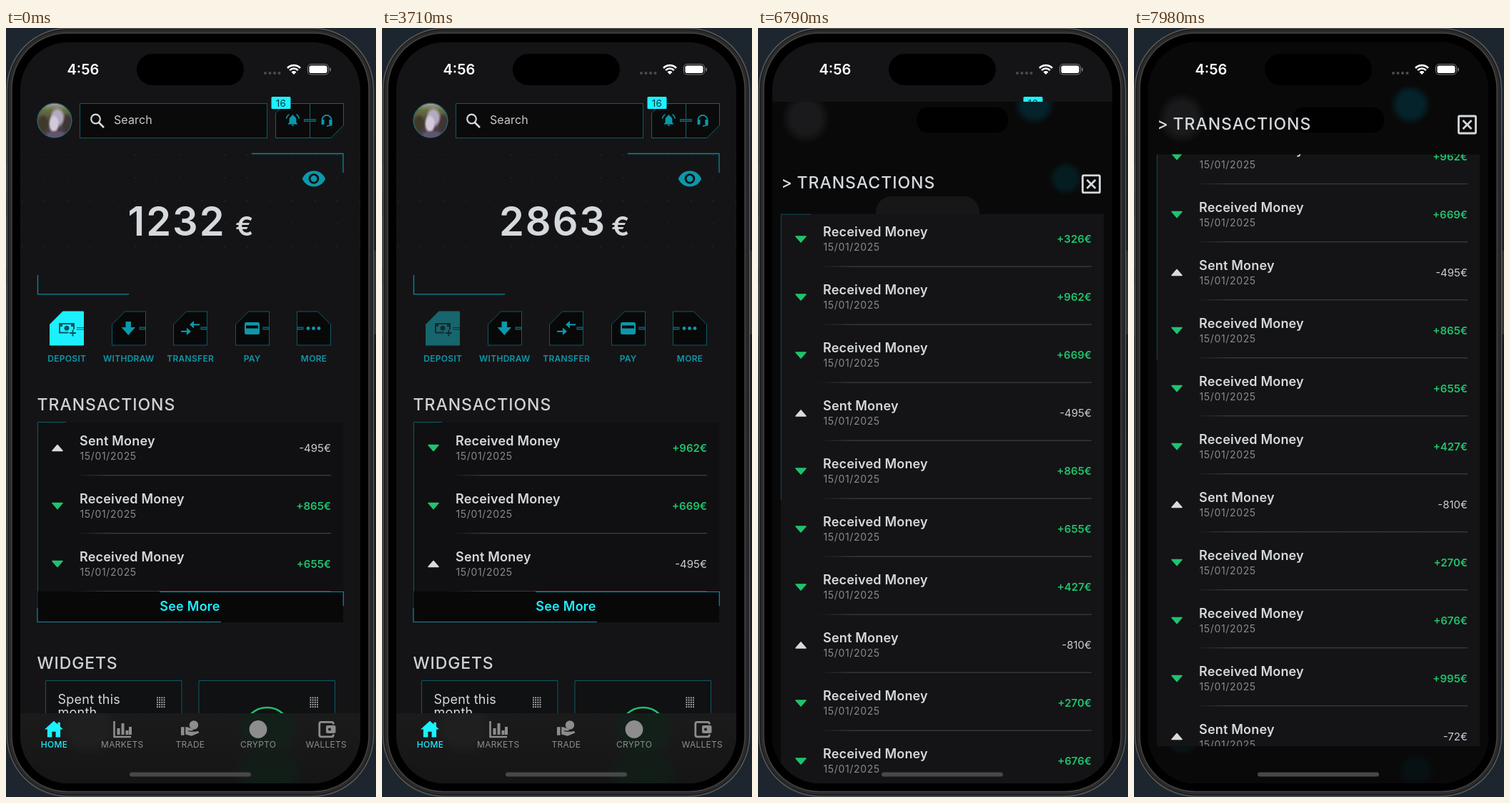
An HTML page with a canvas that plays this animation: 518 by 1074 pixels, repeating every 8 s.

```html
<!DOCTYPE html>
<html lang="en">
<head>
<meta charset="utf-8">
<title>Banking app</title>
<style>
html, body { margin: 0; width: 100%; height: 100%; overflow: hidden; background: #1a2129; }
canvas { display: block; width: 518px; height: 1074px; }
</style>
</head>
<body>
<canvas id="stage"></canvas>
<script>
const W = 518, H = 1074, LOOP = 8000, STEP = 70;
const CYAN = '#1cf0ff', TEAL = '#0b98ab', LINE = '#0c5a65', GREEN = '#20c36d';
const INK = '#d5d9dd', BG = '#141416', GREY = '#8d8d8e', DARK = '#080809';
const canvas = document.getElementById('stage');
const c = canvas.getContext('2d');
const dpr = window.devicePixelRatio || 1;
canvas.width = W * dpr;
canvas.height = H * dpr;

// Newest first; the first three arrive with the deposits.
const amounts = [326, 962, 669, -495, 865, 655, 427, -810, 270, 676, 995, -72];
const presses = [[2870, 3010, 3290], [3500, 3640, 3920], [4130, 4270, 4480]];
const eyeTaps = [[630, 700, 840], [1750, 1820, 1960]];
const morePress = [[6370, 6510, 6790]];

const EYE = 'M12 4.5C7 4.5 2.7 7.6 1 12c1.7 4.4 6 7.5 11 7.5s9.3-3.1 11-7.5c-1.7-4.4-6-7.5-11-7.5z' +
  'M12 17a5 5 0 1 1 0-10 5 5 0 0 1 0 10zM12 9a3 3 0 1 0 0 6 3 3 0 0 0 0-6z';
const BELL = 'M12 21.5a2 2 0 0 0 2-2h-4a2 2 0 0 0 2 2zM18 16v-5c0-3-1.6-5.6-4.5-6.3V4a1.5 1.5 0 0 0-3 0v.7' +
  'C7.6 5.4 6 8 6 11v5l-2 1.6v1h16v-1z';
const HOUSE = 'M12 3L2 12h3v8.5h5v-6h4v6h5V12h3l-3.2-2.9V4.5h-2.6v2.2z';
const HAND = 'M1 11h4v10H1zM6.5 11h2.2l6.3 2.4c1.2.5 1.1 2-.1 2.1h-3.2l-1.7-.6-.3.9 2 .8h6.3l3.4-.6' +
  'c1.3 0 2 1.1 1.6 2.1L14 21.8l-7.5-2z';

function text(s, x, y, size, color, { weight = 400, align = 'left', space = 0 } = {}) {
  c.font = `${weight} ${size}px Inter, Roboto, sans-serif`;
  c.letterSpacing = space + 'px';
  c.textAlign = align;
  c.fillStyle = color;
  c.fillText(s, x, y);
}

function rect(x, y, w, h, color) {
  c.fillStyle = color;
  c.fillRect(x, y, w, h);
}

function round(x, y, w, h, r, fill, stroke, lw = 1) {
  c.beginPath();
  c.roundRect(x, y, w, h, r);
  paint(fill, stroke, lw);
}

function paint(fill, stroke, lw = 1) {
  if (fill) { c.fillStyle = fill; c.fill(); }
  if (stroke) { c.strokeStyle = stroke; c.lineWidth = lw; c.stroke(); }
}

function poly(points, fill, stroke, lw, open) {
  c.beginPath();
  points.forEach(([x, y]) => c.lineTo(x, y));
  if (!open) c.closePath();
  paint(fill, stroke, lw);
}

const line = (points, color, lw = 1) => poly(points, null, color, lw, true);

function disc(x, y, r, fill, stroke, lw) {
  c.beginPath();
  c.arc(x, y, r, 0, 7);
  paint(fill, stroke, lw);
}

function icon(path, cx, cy, scale, color) {
  c.save();
  c.translate(cx, cy);
  c.scale(scale, scale);
  c.translate(-12, -12);
  c.fillStyle = color;
  c.fill(new Path2D(path), 'evenodd');
  c.restore();
}

function glow(x, y, rx, ry, color) {
  c.save();
  c.translate(x, y);
  c.scale(rx, ry);
  const g = c.createRadialGradient(0, 0, 0, 0, 0, 1);
  g.addColorStop(0, color);
  g.addColorStop(.6, color);
  g.addColorStop(1, color + '00');
  disc(0, 0, 1, g);
  c.restore();
}

function clipped(x, y, w, h, draw) {
  c.save();
  c.beginPath();
  c.rect(x, y, w, h);
  c.clip();
  draw();
  c.restore();
}

// Veils an area with the background, fading it as one group.
function veil(alpha, x, y, w, h) {
  c.globalAlpha = 1 - alpha;
  rect(x, y, w, h, BG);
  c.globalAlpha = 1;
}

// Dims at once on touch, eases back after release.
function pressAlpha(t, list) {
  for (const [down, up, end] of list) {
    if (t < down || t >= end) continue;
    if (t < up) return .2;
    const k = (t - up + 35) / (end - up + 35);
    return .2 + .8 * (k < .5 ? 2 * k * k : 1 - 2 * (1 - k) ** 2);
  }
  return 1;
}

function phone() {
  const g = c.createLinearGradient(0, 0, 0, H);
  g.addColorStop(0, '#1d262f');
  g.addColorStop(.5, '#15181d');
  g.addColorStop(1, '#1d262f');
  rect(0, 0, W, H, g);
  for (const [y, h] of [[190, 41], [262, 74], [356, 74]]) rect(0, y, 3, h, '#303236');
  rect(514, 311, 4, 117, '#303236');
  round(1.5, .5, 513, 1072.5, 85, '#1b1b1c', '#585859', 1.6);
  round(4, 3, 508, 1067.5, 82, '#2b2b2c');
  round(8, 7, 500, 1059.5, 78, '#000', '#444445', 1.4);
}

function statusBar() {
  round(183, 36, 150, 44, 22, '#000');
  text('4:56', 85.5, 65, 20, '#fff', { weight: 600 });
  for (let i = 0; i < 4; i++) disc(363 + i * 6.5, 63, 2, '#4b4b4d');
  c.save();
  c.beginPath();
  c.moveTo(403, 65);
  c.arc(403, 65, 20, -Math.PI * .75, -Math.PI * .25);
  c.closePath();
  c.clip();
  disc(403, 64.5, 4.5, '#fff');
  disc(403, 64.5, 8, null, '#fff', 2.6);
  disc(403, 64.5, 12.4, null, '#fff', 2.6);
  c.restore();
  round(422.5, 50.5, 29, 14.5, 4.5, null, '#77777a');
  round(424.5, 52.5, 25, 10.5, 2.8, '#fff');
  round(453, 55.5, 1.8, 5, 1, '#77777a');
}

function avatar() {
  c.save();
  c.beginPath();
  c.arc(68, 129, 23.5, 0, 7);
  c.clip();
  const g = c.createLinearGradient(0, 105, 0, 153);
  g.addColorStop(0, '#a9a3a6');
  g.addColorStop(.2, '#65703f');
  g.addColorStop(.55, '#4c4540');
  g.addColorStop(1, '#4a3a50');
  rect(44, 105, 48, 48, g);
  glow(86, 134, 9, 16, '#3f3535');
  glow(52, 134, 9, 14, '#403a2b');
  glow(72, 125, 11, 15, '#b4a9c0');
  glow(67, 134, 8, 14, '#d2cada');
  glow(70, 150, 18, 7, '#66546f');
  c.restore();
  disc(68, 129, 24, null, '#23838c', 1);
}

function header() {
  avatar();
  rect(103, 105, 263, 49, '#0a0a0b');
  c.strokeStyle = LINE;
  c.lineWidth = 1;
  c.strokeRect(103.5, 105.5, 262, 48);
  disc(125.5, 127, 6.3, null, INK, 2.2);
  line([[130, 132], [137, 139]], INK, 2.6);
  text('Search', 151, 134, 16, '#c6cacd', { space: .1 });

  poly([[391, 105.5], [472.5, 105.5], [472.5, 136], [455, 153.5], [377.5, 153.5], [377.5, 119]], '#0a0a0b', '#0c6672');
  line([[425.5, 106], [425.5, 153]], '#0c6672');
  rect(417, 127, 17, 4, '#0c6672');
  rect(418, 128.3, 15, 1.4, '#093038');
  icon(BELL, 401.5, 129, .82, TEAL);
  c.beginPath();
  c.arc(401.5, 128, 9, 3.3, 4.1);
  c.moveTo(409, 123);
  c.arc(401.5, 128, 9, -.96, -.16);
  paint(null, TEAL, 1.5);
  c.beginPath();
  c.arc(449, 128.5, 6.6, Math.PI, 0);
  c.lineTo(455.6, 135.5);
  c.lineTo(449, 137);
  paint(null, TEAL, 1.7);
  round(441.6, 128, 4, 7, 1.2, TEAL);
  round(452.4, 128, 4, 7, 1.2, TEAL);
  round(371.5, 96, 27, 17, 1.5, CYAN);
  text('16', 385, 109.5, 13.5, '#0a3c44', { align: 'center', space: .4 });
}

function balance(t) {
  for (let y = 177; y < 310; y += 32) {
    for (let x = 22; x < 496; x += 31.5) rect(Math.round(x), y, 1, 1, '#3b3c3f');
  }
  line([[344, 175.5], [472, 175.5], [472, 202]], '#0d8596', 1.3);
  line([[44.5, 345], [44.5, 371.8], [172, 371.8]], '#0d8596', 1.3);

  const hidden = t >= eyeTaps[0][1] && t < eyeTaps[1][1];
  icon(EYE, 431, 210.5, 1.47, TEAL);
  if (hidden) {
    line([[419, 197], [445, 223]], BG, 6);
    line([[419, 199], [443, 223]], TEAL, 2.4);
  }
  veil(pressAlpha(t, eyeTaps), 414, 194, 34, 32);

  const added = presses.filter(p => t >= p[1]).length;
  const total = amounts.slice(3 - added, 3).reduce((a, b) => a + b, 1232);
  text(hidden ? '****' : total, 239, 289.5, 56, INK, { weight: 600, align: 'center', space: 2 });
  text('€', 321, 289.5, 37.5, INK, { weight: 600 });
  return added;
}

function tile(x, fill, stroke, flip) {
  const pts = [[18, 0], [47, 0], [47, 47], [0, 47], [0, 18]];
  poly(pts.map(([px, py]) => [x + (flip ? 47 - px : px), 396 + py]), fill, stroke);
}

function link(x) {
  rect(x, 417.5, 9, 4, '#0c6c79');
  rect(x + 1, 418.8, 7, 1.4, '#071c20');
}

function deposit(t) {
  const dark = '#0b5660';
  tile(61.5, CYAN, CYAN);
  c.strokeStyle = dark;
  c.lineWidth = 2;
  c.strokeRect(75, 413, 20, 12.5);
  disc(85, 419.2, 3.4, dark);
  rect(76, 414, 3, 3, dark);
  rect(91, 414, 3, 3, dark);
  rect(87.5, 421, 12, 10, CYAN);
  line([[93.5, 421.5], [93.5, 430.5]], dark, 2);
  line([[89, 426], [98, 426]], dark, 2);
  line([[99, 418.5], [109, 418.5]], dark);
  line([[99, 421], [109, 421]], dark);
  veil(pressAlpha(t, presses), 60, 394, 51, 51);
}

function actions(t) {
  ['DEPOSIT', 'WITHDRAW', 'TRANSFER', 'PAY', 'MORE'].forEach((s, i) => {
    text(s, 85.3 + 86.45 * i, 466, 12, TEAL, { weight: 600, align: 'center', space: .3 });
    if (i) {
      const x = Math.round(61.5 + 86.4 * i) + .5;
      tile(x, DARK, LINE, i === 4);
      link(i === 4 ? x : x + 38);
    }
  });
  deposit(t);
  poly([[167.5, 410], [175, 410], [175, 418], [181, 418], [171.3, 429], [161.6, 418], [167.5, 418]], TEAL);
  line([[260, 414.2], [271, 414.2]], TEAL, 2);
  poly([[257, 414.2], [263, 409], [263, 419.4]], TEAL);
  line([[245, 423.8], [256, 423.8]], TEAL, 2);
  poly([[259, 423.8], [253, 418.6], [253, 429]], TEAL);
  round(334, 411, 21, 17, 2.5, TEAL);
  rect(336, 415.5, 17, 4, DARK);
  for (const x of [423, 430.5, 438]) disc(x, 419.5, 2.4, TEAL);
}

function row(x, y, width, amount) {
  const up = amount < 0, color = up ? '#d9dadb' : GREEN;
  const s = up ? -1 : 1, mid = y + 35.5;
  c.lineJoin = 'round';
  poly([[x + 21, mid - 4 * s], [x + 35, mid - 4 * s], [x + 28, mid + 4 * s]], color, color, 1.6);
  c.lineJoin = 'miter';
  text(up ? 'Sent Money' : 'Received Money', x + 59, y + 31.5, 18, INK, { weight: 600, space: .2 });
  text('15/01/2025', x + 59.5, y + 52, 14, '#88898b', { space: .65 });
  text((up ? '' : '+') + amount + '€', x + width - 17, y + 40.5, 15, up ? '#c9ccd0' : GREEN,
    { align: 'right', weight: up ? 400 : 600 });
  const g = c.createLinearGradient(x + 52, 0, x + 100, 0);
  g.addColorStop(0, '#3a3b3d00');
  g.addColorStop(1, '#3a3b3d');
  rect(x + 52, y + 73, width - 69, 1.3, g);
}

function transactions(t, added) {
  text('TRANSACTIONS', 43.5, 534, 23, '#cfd2d5', { weight: 500, space: 1 });
  rect(44, 551, 428, 236, '#101012');
  line([[44.5, 787], [44.5, 550.5], [84, 550.5]], LINE);
  amounts.slice(3 - added, 6 - added).forEach((a, i) => row(44, 551 + 81 * i, 428, a));

  rect(44, 787, 428, 43, DARK);
  line([[215, 787.5], [472.3, 787.5], [472.3, 807]], '#0d8c9d', 1.2);
  line([[44, 810], [44, 829.5], [301, 829.5]], '#0d8c9d', 1.2);
  line([[44, 788], [44, 809]], '#093a42');
  text('See More', 257.5, 814, 18, CYAN, { weight: 600, align: 'center', space: .25 });
  veil(pressAlpha(t, morePress), 43, 787, 430, 44);
}

function widgets() {
  text('WIDGETS', 43.5, 895, 23, '#cfd2d5', { weight: 500, space: .9 });
  for (const x of [55.5, 270]) {
    c.beginPath();
    c.rect(x, 911.5, 190.5, 60);
    paint('#101113', LINE);
    for (let i = 0; i < 20; i++) rect(x + 155.5 + i % 4 * 3.2, 934.5 + (i >> 2) * 3.2, 1.8, 1.8, '#b9bbbd');
  }
  text('Spent this', 72.5, 943.5, 18, INK, { space: .25 });
  text('month', 72.5, 962, 18, INK, { space: .25 });
  disc(365.5, 982, 33, null, GREEN, 2.4);
}

function navBar() {
  const g = c.createLinearGradient(0, 957, 0, 1055);
  g.addColorStop(0, '#1b1b1c');
  g.addColorStop(1, '#151516');
  rect(20, 957, 476, 98, g);
  clipped(20, 957, 476, 98, () => {
    glow(115, 978, 42, 38, '#1f1f20');
    glow(366, 975, 46, 50, '#132019');
    glow(368, 1038, 52, 38, '#121d18');
  });
  ['HOME', 'MARKETS', 'TRADE', 'CRYPTO', 'WALLETS'].forEach((s, i) =>
    text(s, 67.5 + 95.2 * i, 1004.5, 12, i ? GREY : CYAN, { weight: i ? 400 : 500, align: 'center', space: .25 }));
  icon(HOUSE, 67, 979.5, 1.3, CYAN);
  line([[151.5, 968], [151.5, 990], [175, 990]], GREY, 2.6);
  for (const [x, y] of [[155.5, 978], [161.5, 971], [167.5, 981], [172, 976]]) rect(x, y, 4, 987 - y, GREY);
  icon(HAND, 257.5, 977.5, 1.14, GREY);
  disc(263, 973.5, 6.2, GREY);
  disc(353, 979.5, 12.4, GREY);
  round(438.8, 969.3, 19.5, 20.5, 2.5, null, GREY, 2.8);
  round(446, 972.5, 16, 14, 2.5, '#1a1a1b');
  round(448, 974, 13.5, 11, 2, GREY);
  disc(453, 979.5, 2, '#1a1a1b');
}

function home(t) {
  rect(20, 20, 476, 1035, BG);
  header();
  const added = balance(t);
  actions(t);
  transactions(t, added);
  widgets();
  navBar();
}

// Critically damped slide from below the screen.
function sheetOffset(t) {
  if (t >= 7140) return 0;
  const k = Math.max(0, (t - 6528) / 1000 * 15.9);
  return 1035 * (1 + k) * Math.exp(-k);
}

function sheet(t) {
  const off = sheetOffset(t), top = 176.5 + off;
  const drag = Math.max(0, (t - 7770) / 210);
  const scroll = 113.5 * drag ** 1.7;
  clipped(20, 20 + off, 476, 1035, () => {
    rect(20, 20, 476, 1035, '#090909');
    glow(67, 126, 34, 36, '#1a1a1c');
    glow(387, 107, 29, 28, '#05232b');
    glow(431, 210, 24, 24, '#051c21');
    round(222, 111, 128, 35, 15, '#010101');
    round(165, 235, 145, 60, 22, '#171718');
    glow(395, 1036, 26, 22, '#071114');
    glow(68, 998, 24, 18, '#071316');
    text('>', 32.5, 141.5 + off, 23, INK, { weight: 500 });
    text('TRANSACTIONS', 54.5, 141.5 + off, 23, INK, { weight: 500, space: 1 });
    round(454.5, 123 + off, 24, 24, 1.5, null, INK, 2.8);
    line([[460.5, 129 + off], [472.5, 141 + off]], INK, 2.6);
    line([[472.5, 129 + off], [460.5, 141 + off]], INK, 2.6);
    clipped(31.5, top, 453, 826.5, () => {
      rect(32, top, 452, 826.5, BG);
      const y = top - scroll;
      line([[32.2, y + 400], [32.2, y + .6], [74, y + .6]], LINE);
      amounts.forEach((a, i) => row(32, y + 81 * i, 452, a));
    });
  });
}

function draw(t) {
  c.setTransform(dpr, 0, 0, dpr, 0, 0);
  phone();
  c.save();
  c.beginPath();
  c.roundRect(20, 20, 476, 1035, 67);
  c.clip();
  home(t);
  if (t > 6510) sheet(t);
  statusBar();
  round(173, 1039.5, 170, 6, 3, '#48484a');
  c.restore();
}

const start = performance.now();
function tick() {
  const t = (performance.now() - start) % LOOP;
  draw(Math.floor(t / STEP) * STEP);
  requestAnimationFrame(tick);
}
tick();
</script>
</body>
</html>
```
